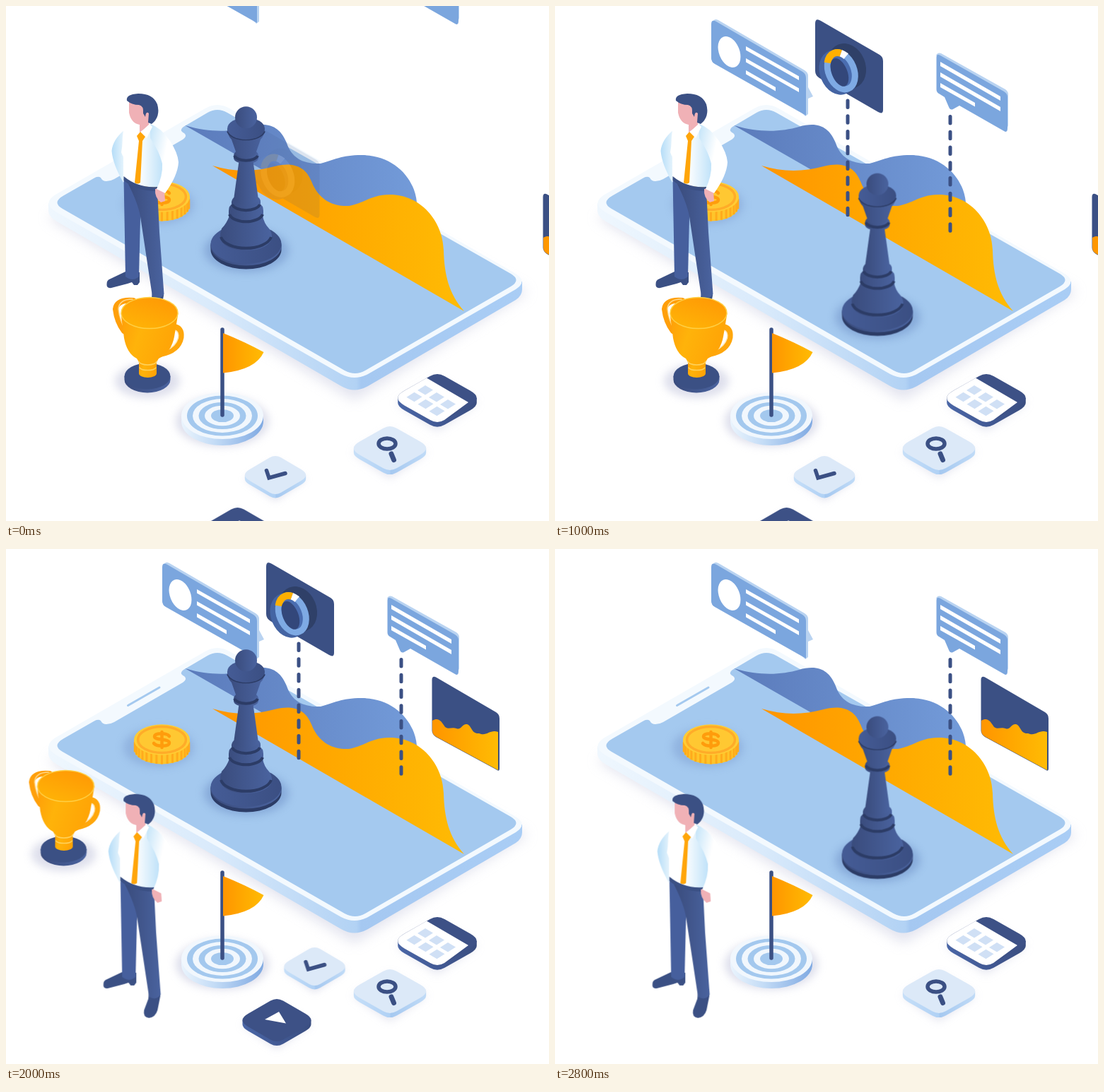
An HTML page for the animation above (3000 ms loop, 768x729 px).

```html
<!DOCTYPE html>
<html lang="en">
<head>
<meta charset="utf-8">
<title>Strategy board</title>
<style>
html, body { margin: 0; width: 100%; height: 100%; overflow: hidden; background: #fff; }
svg { display: block; width: 100vw; height: 100vh; }

/* every move is a hard jump on a 200 ms beat */
.step { animation: 3s step-end infinite; }
#chatA { animation-name: chatA; }
#chatB { animation-name: chatB; }
#queen { animation-name: queen; }
#ghost { animation-name: ghost; }
#donutCard { animation-name: donutCard; }
#dashA { animation-name: dashA; }
#dashB { animation-name: dashB; }
#trophy { animation-name: trophy; }
#man { animation-name: man; }
#check { animation-name: check; }
#play { animation-name: play; }
#waveCard { animation-name: waveCard; }

@keyframes chatA { 0% { transform: translate(0, -131px); } 6.66%, 100% { transform: none; } }
@keyframes chatB { 0% { transform: translate(0, -152px); } 33.33%, 100% { transform: none; } }
@keyframes queen {
  0%, 39.99% { transform: none; }
  13.33%, 73.33%, 100% { transform: translate(116.5px, 94.5px); }
}
@keyframes ghost { 0% { opacity: .12; } 19.99%, 100% { opacity: 0; } }
@keyframes donutCard { 0%, 86.66%, 100% { opacity: 0; } 19.99% { opacity: 1; } }
@keyframes dashA { 0%, 86.66%, 100% { opacity: 0; } 26.66% { opacity: 1; } }
@keyframes dashB { 0% { opacity: 0; } 33.33%, 100% { opacity: 1; } }
@keyframes trophy {
  0% { transform: none; opacity: 1; }
  46.66% { transform: translate(-118.5px, -99px); opacity: 1; }
  93.33%, 100% { transform: none; opacity: 0; }
}
@keyframes man { 0% { transform: none; } 53.33%, 100% { transform: translate(-4.7px, 222.8px); } }
@keyframes check {
  0% { transform: none; opacity: 1; }
  59.99% { transform: translate(55.5px, -73px); opacity: 1; }
  93.33%, 100% { opacity: 0; }
}
@keyframes play {
  0% { transform: translate(-55.5px, 73px); opacity: 1; }
  59.99% { transform: none; opacity: 1; }
  93.33%, 100% { opacity: 0; }
}
@keyframes waveCard { 0% { transform: translate(157px, 85px); } 66.66%, 100% { transform: none; } }

.navy { fill: #3b5084; }
.pale { --top: #dce9f8; --side: url(#paleSide); }
.dark { --top: #3d5186; --side: url(#navySide); }
.line { fill: none; stroke-linecap: round; }
.dash { fill: none; stroke: #3b5084; stroke-width: 5; stroke-linecap: round; stroke-dasharray: 9.6 12.15; }
.seam { fill: none; stroke: #2c3c66; stroke-width: 4; }
</style>
</head>
<body>
<svg viewBox="0 0 768 729" preserveAspectRatio="none">
<defs>
  <linearGradient id="body"><stop stop-color="#eff7fe"/><stop offset=".35" stop-color="#d9eafb"/><stop offset=".65" stop-color="#b2d2f4"/><stop offset=".66" stop-color="#a5c8f1"/><stop offset="1" stop-color="#a9cdf5"/></linearGradient>
  <linearGradient id="blue"><stop stop-color="#5b7bbb"/><stop offset="1" stop-color="#739bd9"/></linearGradient>
  <linearGradient id="orange"><stop stop-color="#ff9500"/><stop offset=".5" stop-color="#ffa900"/><stop offset="1" stop-color="#ffbb04"/></linearGradient>
  <linearGradient id="cup" y2=".3"><stop stop-color="#ff9d08"/><stop offset=".4" stop-color="#ffb30a"/><stop offset="1" stop-color="#ffa406"/></linearGradient>
  <linearGradient id="bowl" y1="1" x2=".6" y2="0"><stop stop-color="#ffb607"/><stop offset="1" stop-color="#ff9b05"/></linearGradient>
  <linearGradient id="stone"><stop stop-color="#3a4c7d"/><stop offset="1" stop-color="#4a639f"/></linearGradient>
  <linearGradient id="stoneTop"><stop stop-color="#455c96"/><stop offset="1" stop-color="#3b4f83"/></linearGradient>
  <linearGradient id="paleSide"><stop stop-color="#c6dff8"/><stop offset=".5" stop-color="#b0d1f5"/><stop offset=".51" stop-color="#a5c8f0"/><stop offset="1" stop-color="#c0dbf7"/></linearGradient>
  <linearGradient id="navySide"><stop stop-color="#4a66a6"/><stop offset=".5" stop-color="#425a95"/><stop offset="1" stop-color="#3a4e80"/></linearGradient>
  <linearGradient id="disc"><stop stop-color="#eaf4fd"/><stop offset=".4" stop-color="#c4dcf6"/><stop offset="1" stop-color="#7fa9e2"/></linearGradient>
  <linearGradient id="shirt"><stop stop-color="#fff"/><stop offset=".4" stop-color="#fff"/><stop offset="1" stop-color="#bfe2f9"/></linearGradient>
  <linearGradient id="armL"><stop stop-color="#b5ddf8"/><stop offset=".7" stop-color="#e2f2fc"/><stop offset="1" stop-color="#fff"/></linearGradient>
  <linearGradient id="armR" y2=".5"><stop stop-color="#c3e4f9"/><stop offset=".6" stop-color="#fff"/></linearGradient>
  <filter id="soft" x="-40%" y="-60%" width="180%" height="220%"><feGaussianBlur stdDeviation="6"/></filter>
  <filter id="haze" x="-20%" y="-20%" width="140%" height="140%"><feGaussianBlur stdDeviation="9"/></filter>

  <g id="tile">
    <path d="M-49 6L0 -24L49 6L0 41Z" fill="#c9cbe0" opacity=".55" filter="url(#soft)"/>
    <path d="M-48.500 0V6Q-48.500 10.600 -40.500 15.200L-9 33.400Q0 38.600 9 33.400L40.500 15.200Q48.500 10.600 48.500 6V0Z" style="fill:var(--side)"/>
    <path d="M-40.500 -9.200L-9 -27.400Q0 -32.600 9 -27.400L40.500 -9.200Q56.500 0 40.500 9.200L9 27.400Q0 32.600 -9 27.400L-40.500 9.200Q-56.500 0 -40.500 -9.200Z" style="fill:var(--top)"/>
  </g>

  <g id="donut">
    <path class="navy" d="M368 25Q368 16 376 21L459 69Q464 72 464 78V147Q464 154 457 150L374 102Q368 98 368 92Z"/>
    <ellipse cx="413" cy="85" rx="26" ry="33" transform="rotate(-22 413 85)" fill="#2f4068"/>
    <g transform="rotate(-22 402 93)" fill="none">
      <ellipse cx="399" cy="93" rx="24.500" ry="32.500" fill="#4464a3"/>
      <ellipse cx="405" cy="93" rx="18" ry="27" fill="#4a6db0" stroke="#7eaae4" stroke-width="9"/>
      <ellipse cx="405" cy="93" rx="18" ry="27" stroke="#ffb000" stroke-width="10" pathLength="100" stroke-dasharray="19 81" stroke-dashoffset="-63"/>
      <ellipse cx="405" cy="93" rx="18" ry="27" stroke="#fff" stroke-width="10" pathLength="100" stroke-dasharray="6 94" stroke-dashoffset="-82"/>
      <ellipse cx="402" cy="94" rx="11" ry="21" fill="#33477a"/>
    </g>
  </g>
</defs>

<!-- phone -->
<path d="M60 300L300 165L738 405L493 558Z" fill="#c6c8de" opacity=".5" filter="url(#haze)"/>
<path d="M60 279V290Q60 298 72 305L474 538Q493 549 512 538L721 416Q730 410 730 401V390Z" fill="url(#body)"/>
<path d="M70 267L280 146Q299 134 318 146L721 379Q738 390 721 401L512 521Q493 531 474 521L70 291Q51 279 70 267Z" fill="#f3f9fe"/>
<path d="M82 268L124 244Q130 240 134 243Q136 248 142 248Q148 248 153 245L250 189Q257 184 252 180Q244 176 251 171L285 151Q299 143 313 151L714 379Q729 388 714 397L508 516Q494 524 479 516L80 287Q64 278 82 268Z" fill="#a4c9ef"/>
<path class="line" d="M172.500 221.500L217 196" stroke="#a4c9ef" stroke-width="3"/>

<!-- charts -->
<path d="M253 169C290 180 320 178 345 171C373 163 388 172 397 194C404 215 420 224 445 223C464 218 474 211 503 211C548 211 578 243 581 278L560 345Z" fill="url(#blue)"/>
<path d="M292 226C322 235 350 235 380 227C393 224 400 224 407 225.500C426 230 430 244 435 255C446 276 464 284 485 283C508 279 516 267 543 267C586 267 618 304 619 346C620 380 626 407 648 432Z" fill="url(#orange)"/>
<g id="ghost" class="step"><use href="#donut" x="-20.500" y="148.500"/></g>

<!-- speech card with avatar -->
<g id="chatA" class="step">
  <path d="M223 23Q225 17 231 20L353 91Q358 94 358 99V115L365 128L358 131V153L354 156Z" fill="#b9d3f1"/>
  <path d="M221 26Q221 18 228 22L350 93Q355 96 355 102V155L226 82Q221 79 221 74Z" fill="#7ba6de"/>
  <ellipse cx="246.500" cy="65" rx="14.500" ry="23" transform="rotate(-22 246.500 65)" fill="#fff"/>
  <path d="M270 57L345 99.500V105L270 62.500ZM270 74L345 116.500V122L270 79.500ZM270 91L312 115V120.500L270 96.500Z" fill="#fff"/>
</g>

<!-- donut card -->
<g id="donutCard" class="step"><use href="#donut"/></g>
<path id="dashA" class="step dash" d="M414 134V296"/>

<!-- speech card -->
<g id="chatB" class="step">
  <path d="M539 70Q541 65 546 67L637 118Q641 121 641 125V172L630 140Z" fill="#b9d3f1"/>
  <path d="M539.500 73Q539.500 67 545 70L635 121Q640 124 640 129V173Q640 180 635 177L572 141L563 146Q559 148 557 143L551 129L543 124Q539.500 122 539.500 118Z" fill="#7ba6de"/>
  <path d="M545 79L630 128V134L545 85ZM545 94L630 143V149L545 100ZM545 109L594 137V142.500L545 115Z" fill="#fff"/>
</g>
<path id="dashB" class="step dash" d="M559 156.500V319"/>

<!-- area chart card -->
<g id="waveCard" class="step">
  <path class="navy" d="M602.500 187Q602 178 609 182L693 231Q698 234 698 240V311Q698 316 693 312L608 266Q602.500 262 602.500 257Z"/>
  <path d="M603 243C611 238 615 243 619 249C624 258 630 251 637 254C644 257 645 247 652 248C659 250 658 262 669 261C680 266 684 255 696 259V313L609 266Q603 263 603 257Z" fill="url(#orange)"/>
</g>

<!-- coin -->
<ellipse cx="216" cy="281" rx="50" ry="28" fill="#7f9fd0" opacity=".5" filter="url(#soft)"/>
<path d="M181 269V283A39.500 21.500 0 0 0 260 283V269Z" fill="#ffc52a"/>
<path id="ridges" stroke="#ffab1c" stroke-width="3" fill="none"/>
<ellipse cx="220.500" cy="270" rx="39.500" ry="21.700" fill="#ffcc35"/>
<ellipse cx="220.500" cy="270" rx="34" ry="18.500" fill="#ffc832" stroke="#ffac28" stroke-width="3.500"/>
<path class="line" d="M231 265C227 260 210 260 210 265.500C210 271 231 268 231 274.500C231 280 213 280 209 275M220.500 259V281" stroke="#ff9c0c" stroke-width="4.500"/>

<!-- chess queen -->
<g id="queen" class="step">
  <ellipse cx="340" cy="346" rx="60" ry="31" fill="#6f92c8" opacity=".55" filter="url(#soft)"/>
  <path d="M289.500 338V345A50 27.500 0 0 0 389.500 345V338Z" fill="#2c3c66"/>
  <path d="M289.500 336V340A50 27.500 0 0 0 389.500 340V336Z" fill="url(#stone)"/>
  <ellipse cx="339.500" cy="337" rx="50" ry="28" fill="url(#stoneTop)"/>
  <path d="M316 297Q312 308 305 315Q303 320 303 327A36.500 19.500 0 0 0 376 327Q376 320 372 315Q365 308 363 297Z" fill="url(#stone)"/>
  <path class="seam" d="M304 327A36 19 0 0 0 375 327"/>
  <path d="M315 290Q315 282 321 280H358Q364 282 364 290V294A24.500 13.500 0 0 1 315 294Z" fill="url(#stone)"/>
  <path class="seam" d="M316 295A24 13 0 0 0 363 295"/>
  <path d="M319 277Q320 272 324 270H355Q360 272 360 277V281A20.500 11.500 0 0 1 319 281Z" fill="url(#stone)"/>
  <path class="seam" d="M320 281A20 10.500 0 0 0 359 281"/>
  <path d="M330 216L322 274A18 9.500 0 0 0 357 274L349 216Z" fill="url(#stone)"/>
  <path d="M322 212Q322 207 328 205H351Q357 207 357 212V215A17.500 8.500 0 0 1 322 215Z" fill="url(#stone)"/>
  <path class="seam" d="M323 212A17 9 0 0 0 356 212" stroke-width="3"/>
  <path d="M313 174Q313 183 319 189L326 209A14 7 0 0 0 353 209L360 189Q366 183 366 174Z" fill="url(#stone)"/>
  <path class="seam" d="M314 177A26 14 0 0 0 365 177" stroke-width="3"/>
  <ellipse cx="339.500" cy="173.500" rx="26.500" ry="15.500" fill="url(#stoneTop)"/>
  <circle cx="339.500" cy="157.800" r="15.500" fill="url(#stone)"/>
</g>

<!-- man -->
<g id="man" class="step">
  <path class="navy" d="M169 376L148 386Q142 388 142.500 394Q142 400 149 399L172 393L178 391L181 395H186L189 391V377Z"/>
  <path class="navy" d="M207 403L206 414L200 430Q198 440 207 441Q216 440 219 430L223 410V400Z"/>
  <path d="M166.500 243L190 258L190 300L188 383Q179 391 169 383Z" fill="#465f9d"/>
  <path d="M173 252L214 259L217 320L223.500 408Q217 417 207 411L190 298Q187 280 173 252Z" fill="url(#stone)"/>
  <path d="M168 175Q151 189 149.500 205Q151 224 166 250L172 230L163 207Z" fill="url(#armL)"/>
  <path d="M181 167L166 176Q163 195 166 212V242Q188 259 218 256Q222 240 222 222L218 190L203 168Z" fill="url(#shirt)"/>
  <path class="navy" d="M166.500 241Q187 258 214 256L216 262Q186 263 166.500 247Z"/>
  <path d="M211 259Q219 257 224 261L225 276L219 278Q210 271 211 259Z" fill="#f0b1b6"/>
  <path d="M204 167Q219 172 232 191Q243 208 244 221Q243 240 225 265L213 259Q222 240 221 223Q217 206 204 187Z" fill="url(#armR)"/>
  <path d="M174 136V151Q177 166 189 168L189 179L202 169L203 146L190 136Z" fill="#f0b1b6"/>
  <path d="M181 167L189 179L181 186L176 172ZM203 167L190 179L199 187L207 171Z" fill="#fff"/>
  <path d="M190 178L185 184L188 191L182 250Q186 253 190 250L193 191L197 185Z" fill="#ffa50a"/>
  <path class="navy" d="M171 134Q169 125 187 124Q208 124 214 139Q219 157 206 167L201 165L202 152Q198 148 197 157L194 152Q195 141 188 140Q178 140 171 134Z"/>
</g>

<!-- target and flag -->
<ellipse cx="306" cy="588" rx="66" ry="36" fill="#c9cbe0" opacity=".6" filter="url(#soft)"/>
<path d="M248 580V588A58 34 0 0 0 364 588V580Z" fill="url(#disc)"/>
<g id="rings"></g>
<path class="line" d="M306 458V579" stroke="#3b5084" stroke-width="5.500"/>
<path d="M307 463Q337 475 364.500 490Q353 515 307 519.500Z" fill="url(#orange)"/>

<!-- trophy -->
<g id="trophy" class="step">
  <ellipse cx="200" cy="531" rx="46" ry="24" fill="#c9cbe0" opacity=".6" filter="url(#soft)"/>
  <path d="M167.500 524V529A32.500 18.500 0 0 0 232.500 529V524Z" fill="url(#stone)"/>
  <ellipse cx="200" cy="524" rx="32.500" ry="18.500" fill="#3b5084"/>
  <path class="line" d="M180 417Q157 415 155 429Q157 447 167 460" stroke="#ff9f0a" stroke-width="8"/>
  <path class="line" d="M179 415Q160 415 159 429Q161 446 168 456" stroke="#ffd98a" stroke-width="1.500"/>
  <path class="line" d="M237 454Q249 455 247.500 469Q244 488 218 493" stroke="#ffa70c" stroke-width="8"/>
  <path class="line" d="M238 459Q245 460 243.500 470Q240 482 226 488" stroke="#ffe9bd" stroke-width="1.500"/>
  <path d="M188 494V520A12.500 6 0 0 0 213 520V494Z" fill="url(#cup)"/>
  <path d="M162.500 435L167 470Q171 492 185 499L188 504A12.500 5 0 0 0 213 504L216 499Q234 490 238 468L243.500 435Z" fill="url(#cup)"/>
  <path class="line" d="M188 503A12.500 5 0 0 0 213 503M189 512A12 5 0 0 0 212 512" stroke="#ffd25c" stroke-width="1.500"/>
  <ellipse cx="203" cy="434.500" rx="40" ry="22" fill="url(#bowl)" stroke="#ffcf45" stroke-width="1.500"/>
</g>

<!-- calendar -->
<use href="#tile" class="dark" transform="translate(610 555) scale(1.150 1.130)"/>
<path d="M563.500 544.600L595 526.600L654 561L620 586Q610 592 600 586L563.500 565.400Q545 555 563.500 544.600Z" fill="#fff"/>
<path id="days" fill="#d0e0f5"/>

<!-- search -->
<use href="#tile" class="pale" transform="translate(543 626) scale(1.055 1.030)"/>
<ellipse cx="539" cy="619.500" rx="12" ry="7.500" fill="none" stroke="#3b5084" stroke-width="5.500"/>
<path class="line" d="M545 634L548.500 642.500" stroke="#3b5084" stroke-width="7"/>

<!-- check -->
<g id="check" class="step">
  <use href="#tile" class="pale" transform="translate(381 664) scale(.89 .9)"/>
  <path class="line" d="M368.500 657.500L372 668L395 661.500" stroke="#3b5084" stroke-width="5.500"/>
</g>

<!-- play -->
<g id="play" class="step">
  <use href="#tile" class="dark" transform="translate(383 667)"/>
  <path d="M366 666L386 655L396 671.500Z" fill="#fff"/>
</g>
</svg>
<script>
const $ = id => document.getElementById(id);

// coin edge: evenly turned grooves along the front half
let grooves = "";
for (let i = 1; i < 16; i++) {
  const a = Math.PI * i / 16;
  const x = 220.5 + 39 * Math.cos(a), y = 269 + 21.5 * Math.sin(a);
  grooves += `M${x} ${y}v14`;
}
$("ridges").setAttribute("d", grooves);

// target: alternating rings shrinking to the centre
$("rings").innerHTML = [58, 50, 42, 33.5, 25, 16].map((r, i) =>
  `<ellipse cx="306" cy="580" rx="${r}" ry="${r * .57}" fill="${i % 2 ? "#a3c8ee" : "#f1f7fd"}"/>`).join("");

// calendar: two rows of three days
let days = "";
for (let row = 0; row < 2; row++)
  for (let col = 0; col < 3; col++)
    days += `M${593 + 16 * col - 15.5 * row} ${537 + 10 * col + 9.8 * row}l11 6.500l-11 7l-11 -6.500z`;
$("days").setAttribute("d", days);
</script>
</body>
</html>
```
